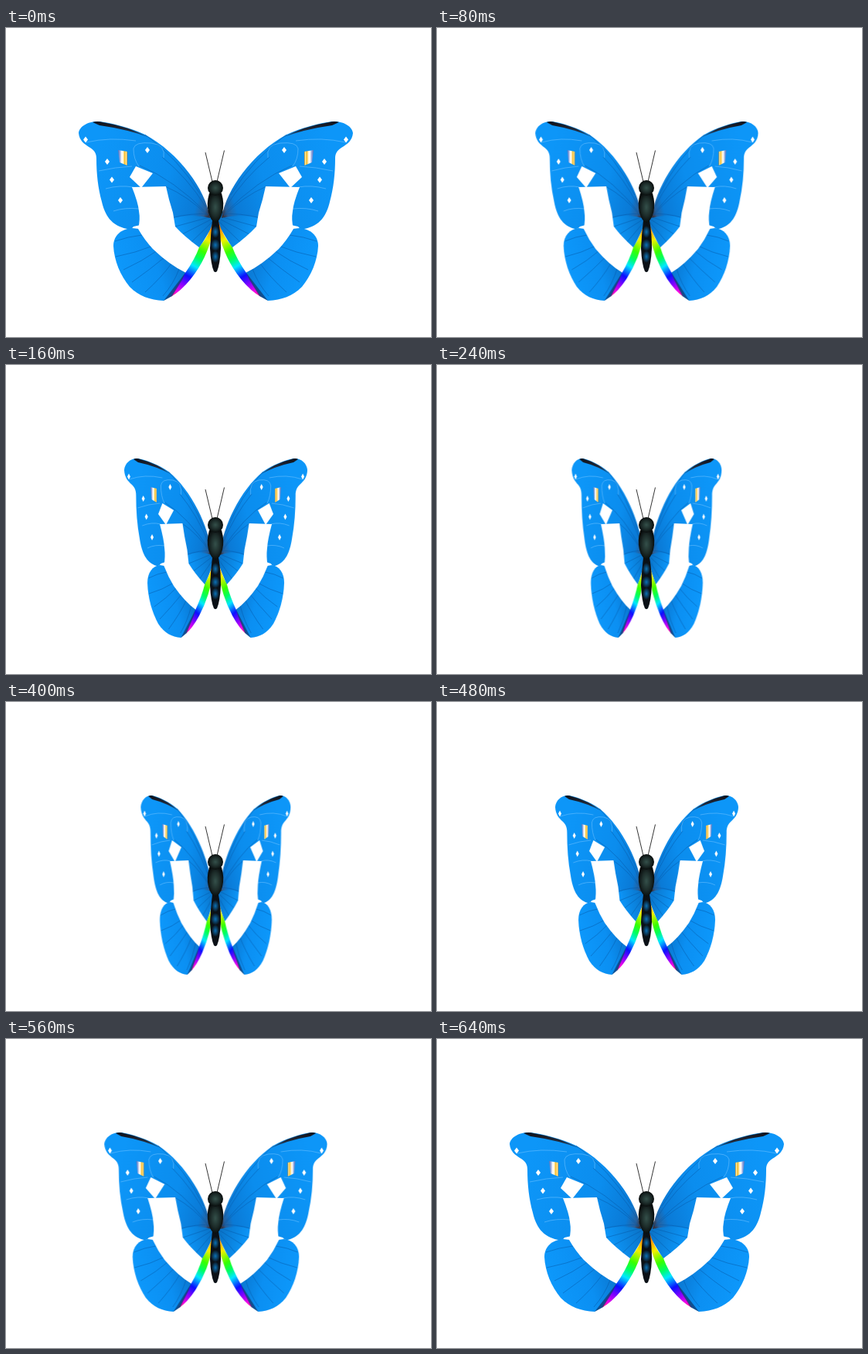
An HTML page without scripts that plays this animation: 550 px wide and 400 px high, repeating every 0.72 s.

```html
<!DOCTYPE html>
<html lang="en">
<head>
<meta charset="utf-8">
<title>Butterfly</title>
<style>
  html, body { margin: 0; width: 100%; height: 100%; overflow: hidden; background: #fff; }
  svg { display: block; width: 550px; height: 400px; }
  .wings {
    transform-origin: 271.5px 0;
    animation: flap 720ms step-end infinite;
  }
  /* each step narrows the wings by the same ratio, then opens them again */
  @keyframes flap {
    0%, 88.8889% { transform: scaleX(1); }
    11.1111%, 77.7778% { transform: scaleX(.813); }
    22.2222%, 66.6667% { transform: scaleX(.668); }
    33.3333%, 55.5556% { transform: scaleX(.547); }
    44.4444% { transform: scaleX(.448); }
    100% { transform: scaleX(1); }
  }
  .veins path { fill: none; vector-effect: non-scaling-stroke; }
  .dark { stroke: #0658a8; stroke-width: .7; stroke-opacity: .75; }
  .pale { stroke: #6cc0ff; stroke-width: .7; stroke-opacity: .85; }
</style>
</head>
<body>
<svg viewBox="0 0 550 400">
  <defs>
    <linearGradient id="fore" gradientUnits="userSpaceOnUse" x1="110" y1="190" x2="264" y2="238">
      <stop offset="0" stop-color="#0d96f8"/>
      <stop offset=".6" stop-color="#0b8dee"/>
      <stop offset=".88" stop-color="#0a7ad6"/>
      <stop offset=".96" stop-color="#28609c"/>
      <stop offset="1" stop-color="#3a3038"/>
    </linearGradient>
    <linearGradient id="hind" gradientUnits="userSpaceOnUse" x1="150" y1="325" x2="226" y2="300">
      <stop offset="0" stop-color="#0d98fb"/>
      <stop offset=".6" stop-color="#0b8ff2"/>
      <stop offset="1" stop-color="#0a78d2"/>
    </linearGradient>
    <linearGradient id="fan" gradientUnits="userSpaceOnUse" x1="225" y1="262" x2="266" y2="245">
      <stop offset="0" stop-color="#0c94f6"/>
      <stop offset="1" stop-color="#0a72c6"/>
    </linearGradient>
    <linearGradient id="tip" gradientUnits="userSpaceOnUse" x1="115" y1="121" x2="186" y2="142">
      <stop offset="0" stop-color="#10131c"/>
      <stop offset=".65" stop-color="#222a3a"/>
      <stop offset="1" stop-color="#0b70c0"/>
    </linearGradient>
    <linearGradient id="rainbow" gradientUnits="userSpaceOnUse" x1="268" y1="252" x2="215" y2="347">
      <stop offset="0" stop-color="#ff5a00"/>
      <stop offset=".1" stop-color="#ff9a00"/>
      <stop offset=".21" stop-color="#f4f000"/>
      <stop offset=".36" stop-color="#38ff00"/>
      <stop offset=".46" stop-color="#00ff60"/>
      <stop offset=".56" stop-color="#00e8ff"/>
      <stop offset=".7" stop-color="#0a10ff"/>
      <stop offset=".82" stop-color="#8a00ff"/>
      <stop offset=".92" stop-color="#f000e8"/>
      <stop offset="1" stop-color="#ff2090"/>
    </linearGradient>
    <linearGradient id="gold">
      <stop offset="0" stop-color="#5a6cb4"/>
      <stop offset=".2" stop-color="#8fa6e0"/>
      <stop offset=".4" stop-color="#fff"/>
      <stop offset=".55" stop-color="#fff4d0"/>
      <stop offset=".75" stop-color="#f6b414"/>
      <stop offset=".88" stop-color="#fff0b0"/>
      <stop offset="1" stop-color="#b87a10"/>
    </linearGradient>
    <radialGradient id="shell">
      <stop offset="0" stop-color="#34504a"/>
      <stop offset=".6" stop-color="#1c2b29"/>
      <stop offset="1" stop-color="#080c0c"/>
    </radialGradient>
    <radialGradient id="ring">
      <stop offset="0" stop-color="#0c70b4"/>
      <stop offset="1" stop-color="#0c70b4" stop-opacity="0"/>
    </radialGradient>

    <path id="spot" d="M0-4 3 0 0 4-3 0Z" fill="#fff"/>

    <g id="wing">
      <path fill="url(#hind)" d="M163 259C149 260 139 269 139 282C140 302 148 320 160 335C172 347 186 352 204 353L216 346L234 317L190 262Z"/>
      <path fill="url(#fan)" d="M212 243L262 236L270 252L250 285L216 262Z"/>
      <path fill="url(#fore)" d="M264 246C261 226 250 205 237 188C221 167 202 150 180 138C160 129 138 123 121 121C107 120 95 127 94 136C95 146 101 150 109 155C115 159 117 163 117 169C117 188 119 207 124 225C128 242 136 256 157 260Q162 261 165 257L215 246Q240 240 264 246Z"/>
      <path fill="url(#tip)" d="M112 122Q118 120 125 122Q157 127 186 142Q157 131 121 126Z"/>

      <g class="veins">
        <path class="dark" d="M173 178Q218 197 260 240M202 167Q236 195 258 231M206 205Q236 218 261 243M214 246Q240 239 264 241M180 138Q222 168 252 216"/>
        <path class="dark" d="M219 257L263 245M228 267L265 248M240 277L267 251"/>
        <path class="dark" d="M142 296Q168 291 190 282M152 313Q176 302 196 288M163 329Q187 312 205 297M180 342Q202 322 214 305M203 347Q217 331 224 312M141 276Q158 270 176 268"/>
        <path class="pale" d="M104 148Q134 141 168 146M204 168Q207 151 188 149Q167 147 165 156Q165 170 172 179M120 185Q142 180 163 179M129 208Q147 203 165 206M139 237Q154 232 172 234"/>
      </g>

      <path fill="#fff" d="M163 206L207 205L211 222L216 239L219 257Q231 270 250 284L233 317Q212 307 190 286Q179 274 171 260Q174 248 172 237Q171 226 163 206Z"/>
      <path fill="#fff" d="M168 179L190 188L175 207L160 193Z"/>
      <path fill="url(#rainbow)" d="M268 251Q263 268 250 284Q244 300 232 317L213 348Q226 341 239 325Q260 299 268 264Z"/>
      <path fill="#123a70" fill-opacity=".75" d="M232 317L204 353L215 347L228 326Z"/>
      <path fill="url(#gold)" d="M145 158L157 160L157 178L147 174Z"/>
      <use href="#spot" x="103" y="144.500"/>
      <use href="#spot" x="131" y="173"/>
      <use href="#spot" x="137" y="196.500"/>
      <use href="#spot" x="148" y="223"/>
      <use href="#spot" x="183" y="158"/>
    </g>
  </defs>

  <g class="wings">
    <use href="#wing"/>
    <use href="#wing" transform="matrix(-1 0 0 1 543 0)"/>
  </g>

  <path fill="none" stroke="#333" d="M267 199L258 161M273 199L282.500 158.500"/>
  <path fill="#0a1016" d="M267 249Q271 247 275 249Q278 266 278 285Q277 306 273 315Q271 317 269 315Q265 306 264 285Q265 266 267 249Z"/>
  <g fill="url(#ring)">
    <ellipse cx="271" cy="264" rx="5" ry="8"/>
    <ellipse cx="271" cy="281" rx="6" ry="8"/>
    <ellipse cx="271" cy="296" rx="5" ry="8"/>
  </g>
  <path fill="url(#shell)" d="M263 214Q271 210 279 214Q283 228 280 239Q277 250 271 252Q265 250 262 239Q259 228 263 214Z"/>
  <circle cx="271" cy="207" r="10" fill="url(#shell)"/>
</svg>
</body>
</html>
```
